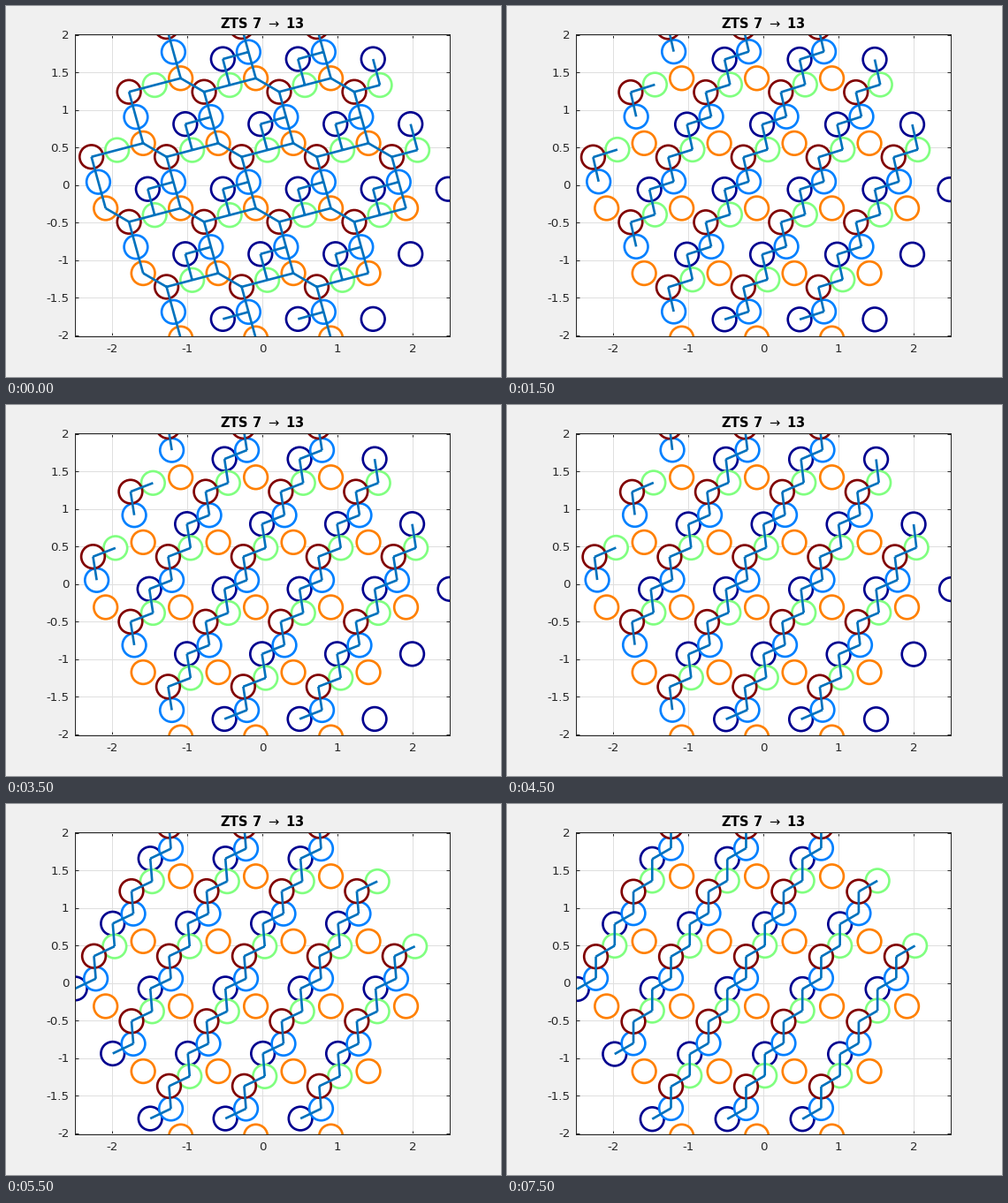
A matplotlib script for the animation above (8 s loop, 560 px wide and 420 px high).

```python
import numpy as np
import matplotlib.pyplot as plt
from matplotlib.animation import FuncAnimation
from matplotlib.patches import Circle

W, H, DPI = 560, 420, 80
FRAMES, STEP_MS = 16, 500
LEFT, TOP, AX_W, AX_H = 77.6, 31.7, 424.8, 342
UNIT = AX_W / 5
YMAX = AX_H / UNIT / 2
INK = "#262626"
ROW = np.sqrt(3) / 2
LINE = 2.67
RADIUS = 13.33 / UNIT

plt.rcParams["font.family"] = "DejaVu Sans"
plt.rcParams["mathtext.fontset"] = "dejavusans"


def px(n):
    """Pixels to points."""
    return n * 72 / DPI


fig = plt.figure(figsize=(W / DPI, H / DPI), dpi=DPI, facecolor="#f0f0f0")
ax = fig.add_axes([LEFT / W, 1 - (TOP + AX_H) / H, AX_W / W, AX_H / H])
ax.set(xlim=(-2.5, 2.5), ylim=(-YMAX, YMAX), facecolor="white")
ax.set_xticks(range(-2, 3))
ax.set_yticks(np.arange(-2, 2.1, 0.5))
ax.set_axisbelow(True)
ax.grid(color="#dfdfdf", lw=px(1))
ax.tick_params(direction="in", length=px(4.25), width=px(1), color=INK,
               top=True, right=True, labelbottom=False, labelleft=False)
for spine in ax.spines.values():
    spine.set(color=INK, linewidth=px(1))


def label(x, y, text, size=13.33, **kw):
    fig.text(x / W, 1 - y / H, text, fontsize=px(size), va="baseline", **kw)


for v in range(-2, 3):
    label(LEFT + (v + 2.5) * UNIT, 392, f"{v}", ha="center", color=INK)
for v in np.arange(-2, 2.1, 0.5):
    label(71.5, TOP + (YMAX - v) * UNIT + 4.7, f"{v:g}", ha="right", color=INK)
label(290, 25, r"ZTS 7 $\rightarrow$ 13", size=14.67, ha="center",
      weight="bold", color="black")

# Hexagonal patch of cells: rows of 3, 4, 5, 4, 3
CELLS = [(n - (4 - abs(j)) / 2, j) for j in range(-2, 3) for n in range(5 - abs(j))]
CELL_SET = set(CELLS)

NAVY, BLUE, GREEN, ORANGE, RED = range(5)
COLORS = ["#00008f", "#0080ff", "#80ff80", "#ff8000", "#800000"]

# Site positions inside a cell at both ends of the transition
X0, Y0, B = -0.23, 0.2085, 1 / np.sqrt(48)
END = np.array([(X0 + 0.75, Y0 - 2 * B), (X0, Y0 - B), (X0 + 0.25, Y0 + 2 * B),
                (-0.087, -0.309), (X0, Y0 + B)])
START = END + [(-0.046, 0.027), (0.046, -0.023), (0.046, -0.031),
               (0, 0), (-0.046, 0.023)]

# Bonds: site, other site, shift to the other cell (x, row)
CHAIN = [(RED, BLUE, 0, 0), (RED, GREEN, 0, 0)]
NAVY_BONDS = [(NAVY, BLUE, 1, 0), (NAVY, GREEN, 0.5, -1)]
WRAPPED_BONDS = [(NAVY, BLUE, 0, 0), (NAVY, GREEN, -0.5, -1)]
ORANGE_BONDS = [(BLUE, ORANGE, 0, 0), (GREEN, ORANGE, 0.5, 1), (ORANGE, RED, 0.5, -1)]

GAP = (np.nan, np.nan)

# White discs: later colours cover earlier ones, bonds lie on top
atoms = [[ax.add_patch(Circle((0, 0), RADIUS, fc="white", ec=color, lw=px(LINE),
                              zorder=2 + 0.01 * i)) for _ in CELLS]
         for i, color in enumerate(COLORS)]
bonds, = ax.plot([], [], color="#0072bd", lw=px(LINE), zorder=2.2,
                 solid_capstyle="butt", solid_joinstyle="miter")


def place(cell, site):
    return np.array([cell[0], cell[1] * ROW]) + site


def update(k):
    sites = START + (END - START) * k / (FRAMES - 1)
    wrapped = k >= 10
    if wrapped:
        sites[NAVY, 0] -= 1
    for group, site in zip(atoms, sites):
        for atom, cell in zip(group, CELLS):
            atom.center = place(cell, site)

    links = CHAIN + (WRAPPED_BONDS if wrapped else NAVY_BONDS)
    if k == 0:
        links = links + ORANGE_BONDS
    segs = []
    for a, b, dx, dj in links:
        for x, j in CELLS:
            other = (x + dx, j + dj)
            if other in CELL_SET:
                segs += [place((x, j), sites[a]), place(other, sites[b]), GAP]
    bonds.set_data(*np.array(segs).T)
    return [bonds]


anim = FuncAnimation(fig, update, frames=FRAMES, interval=STEP_MS,
                     repeat=True, repeat_delay=0, blit=False)
plt.show()
```
